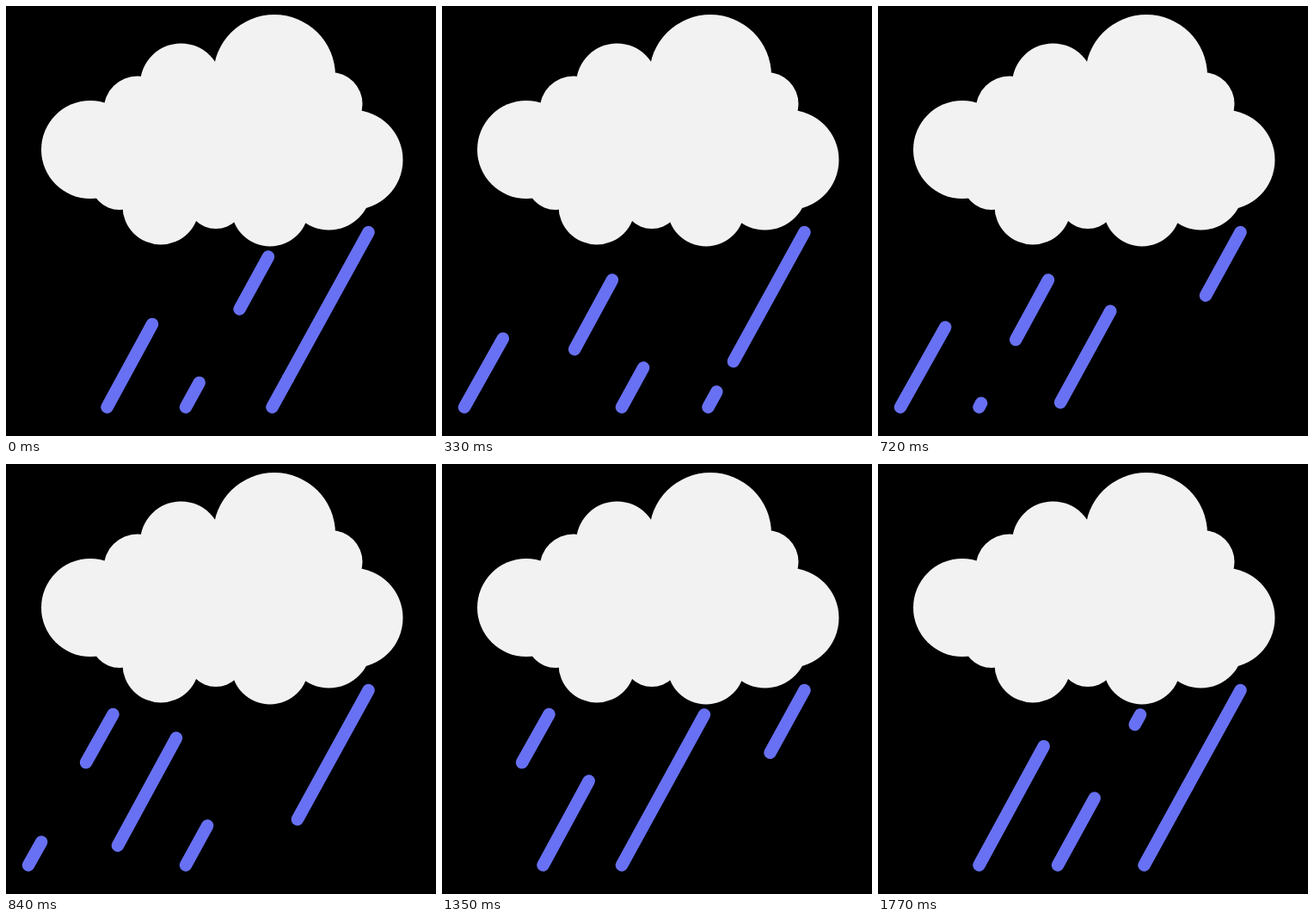
These frames come from a looping animation (500x500 px, 1800 ms). An HTML page with a canvas:

```html
<!DOCTYPE html>
<html lang="en">
<head>
<meta charset="utf-8">
<title>Rain cloud</title>
<style>
html, body { margin: 0; width: 100%; height: 100%; overflow: hidden; background: #000; }
canvas { display: block; }
</style>
</head>
<body>
<canvas id="stage" width="500" height="500"></canvas>
<script>
const ctx = document.getElementById('stage').getContext('2d');
const LOOP = 1800, STEP = 30;
const RATE = 0.094;  // part of a streak covered per step
const CYCLE = 62;    // steps until the gusts repeat, a little longer than the loop
const GROUND = 466.5;

// Puffs in order around the cloud: x, y, radius
const puffs = [
  [98, 167, 57], [153, 121, 39.5], [203.5, 91, 47.5], [312, 81, 71],
  [377.5, 114, 37], [403.5, 179, 58], [375.5, 211, 49.5], [307, 234.5, 45],
  [244, 225, 34], [180, 233, 44.5], [132, 203, 34]
];

// Streaks from left to right: top x, top y, x at the ground
const streaks = [
  [124.5, 291, 26], [198, 318.5, 117.5], [305, 291.5, 209], [421.5, 263, 309.5]
];

// A gust sweeps to the right: each streak starts to fall at its own step
// and lets go of the cloud when the next streak starts.
const gusts = [
  [0, 5.2, 13.7, 20.15, 30.2],
  [12, 19, 29.75, 41.2, 53.1],
  [24.6, 32.5, 41.4, 53.1, 63.3],
  [41.6, 47, 58.3, 65.15, 75.15]
];

const fall = steps => Math.min(1, Math.max(0, steps * RATE));
const mix = (a, b, k) => a + (b - a) * k;

function drawCloud() {
  ctx.fillStyle = '#f2f2f2';
  ctx.beginPath();
  puffs.forEach(([x, y]) => ctx.lineTo(x, y));
  ctx.fill();
  for (const [x, y, r] of puffs) {
    ctx.beginPath();
    ctx.arc(x, y, r, 0, Math.PI * 2);
    ctx.fill();
  }
}

function drawDrop([x, y, end], tail, head) {
  if (head <= tail) return;
  ctx.beginPath();
  for (const k of [tail, head]) ctx.lineTo(mix(x, end, k), mix(y, GROUND, k));
  ctx.stroke();
}

function drawGust(starts, step) {
  streaks.forEach((streak, i) =>
    drawDrop(streak, fall(step - starts[i + 1]), fall(step - starts[i])));
}

function draw(time) {
  const step = Math.floor((time % LOOP) / STEP);
  ctx.fillStyle = '#000';
  ctx.fillRect(0, 0, 500, 500);
  drawCloud();
  ctx.strokeStyle = '#6871f3';
  ctx.lineWidth = 14.5;
  ctx.lineCap = 'round';
  for (const starts of gusts) {
    drawGust(starts, step);
    drawGust(starts, step + CYCLE);
  }
}

const begin = performance.now();
function tick() {
  draw(performance.now() - begin);
  requestAnimationFrame(tick);
}
tick();
</script>
</body>
</html>
```
